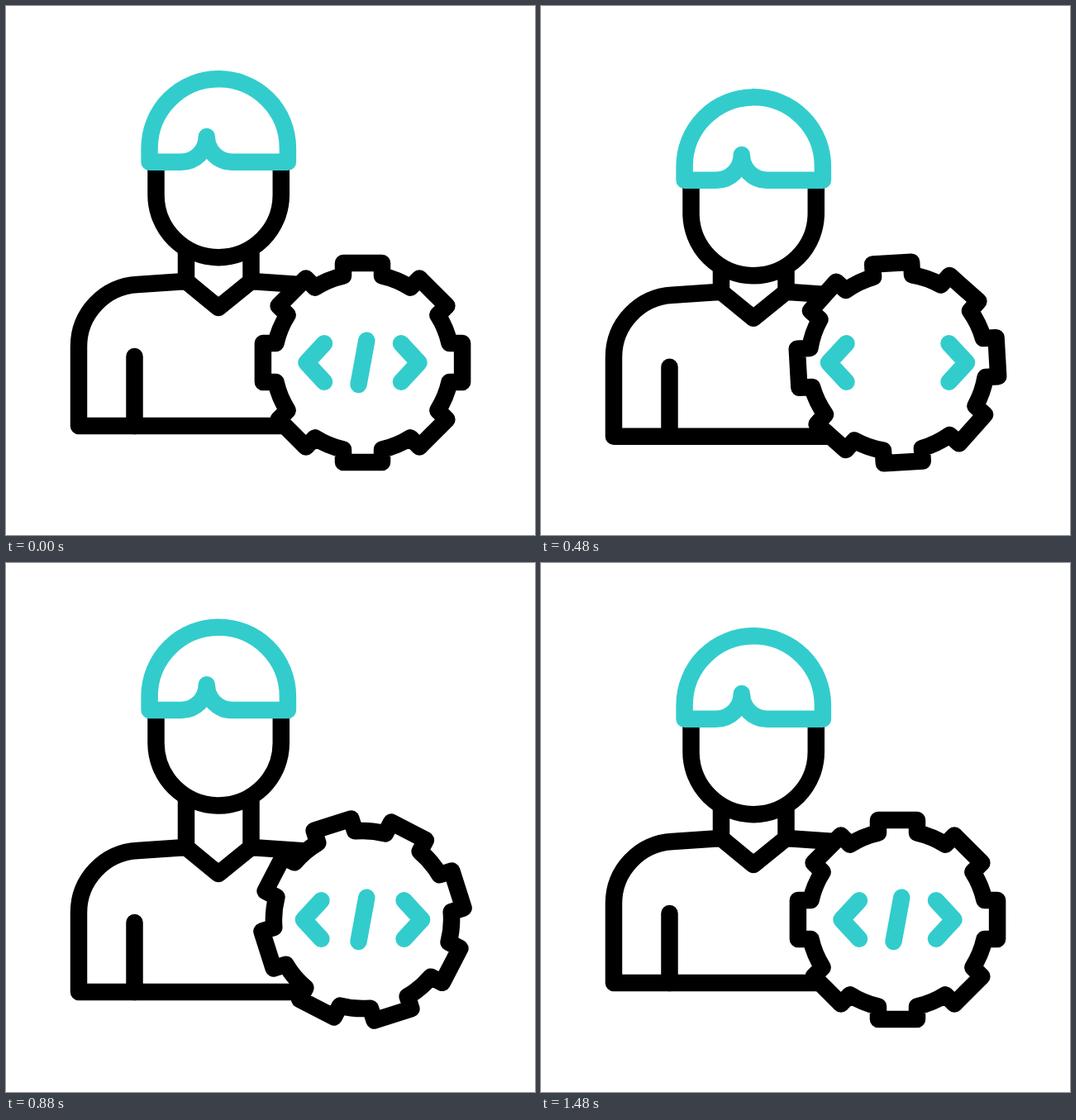
Animation, 640 px wide and 640 px high, one loop 1520 ms. Source, as an HTML page:

```html
<!DOCTYPE html>
<html lang="en">
<head>
<meta charset="utf-8">
<style>
  html, body { margin: 0; height: 100%; overflow: hidden; background: #fff; }
  svg { display: block; width: 100vw; height: 100vh; }
</style>
</head>
<body>
<svg viewBox="0 0 640 640" fill="none" stroke="#000" stroke-width="20.5" stroke-linejoin="round">
  <g id="body">
    <path d="M360 508H88V412A75 75 0 0 1 159 337L218 333L257 365L296.5 333L362 337.5"/>
    <path d="M155.5 424V508" stroke-linecap="round"/>
  </g>
  <path id="neck"/>
  <g id="head" fill="#fff">
    <path d="M181.5 190V228.5A75.6 75.6 0 0 0 332.8 228.5V190"/>
    <path stroke="#3cc" d="M173.6 188.7H212A30.8 30.8 0 0 0 242.8 158A30.8 30.8 0 0 0 273.6 188.7H340.9V172A83.6 83.6 0 0 0 173.6 172Z"/>
  </g>
  <path id="gear" fill="#fff"/>
  <g stroke="#3cc" stroke-linecap="round">
    <path id="left" d="M385 408.3L363.5 431.5L385 454.7"/>
    <path id="right" d="M478 408.3L499.5 431.5L478 454.7"/>
    <path id="slash" d="M436.3 404.7L426.5 458"/>
  </g>
</svg>
<script>
const LOOP = 1520, STEP = 40, CENTER = 431.5, TEETH = 8;
const part = id => document.getElementById(id);
const smooth = s => s * s * (3 - 2 * s);
const cubic = s => s < .5 ? 4 * s ** 3 : 1 - 4 * (1 - s) ** 3;
const progress = (t, from, to) => Math.min(1, Math.max(0, (t - from) / (to - from)));

// keys: [time, value] pairs, eased from one to the next
function track(t, keys) {
  let value = keys[0][1];
  for (let i = 1; i < keys.length; i++) {
    const [from, a] = keys[i - 1], [to, b] = keys[i];
    if (t >= from) value = a + (b - a) * smooth(progress(t, from, to));
  }
  return value;
}

function gearPath() {
  const tooth = [[-23.5, -105], [-23.5, -120.6], [23.5, -120.6], [23.5, -105]];
  let d = '';
  for (let i = 0; i < TEETH; i++) {
    const angle = i * 2 * Math.PI / TEETH, c = Math.cos(angle), s = Math.sin(angle);
    tooth.forEach(([x, y], k) => {
      const command = k ? 'L' : i ? 'A107.6 107.6 0 0 1 ' : 'M';
      d += `${command}${x * c - y * s} ${x * s + y * c}`;
    });
  }
  return d + 'A107.6 107.6 0 0 1 -23.5 -105Z';
}

const move = (id, x, y) => part(id).setAttribute('transform', `translate(${x} ${y})`);

function draw(t) {
  const body = track(t, [[140, 0], [600, 15.4], [640, 15.4], [1320, 0]]);
  const head = track(t, [[100, 0], [520, 22.6], [1080, -24.4], [1410, 0]]);
  const spread = track(t, [[0, 0], [520, 15.8], [1040, 0]]);
  const turn = 180 * cubic(progress(t, 0, 1240));
  move('body', 0, body);
  move('head', 0, head);
  part('neck').setAttribute('d', `M218 ${280 + head}V${333 + body}M296.5 ${280 + head}V${333 + body}`);
  part('gear').setAttribute('transform', `translate(${CENTER} ${CENTER}) rotate(${turn})`);
  move('left', -spread, 0);
  move('right', spread, 0);
  part('slash').style.visibility = t >= 400 && t < 640 ? 'hidden' : 'visible';
}

part('gear').setAttribute('d', gearPath());
const start = performance.now();
function tick() {
  const t = (performance.now() - start) % LOOP;
  draw(Math.floor(t / STEP) * STEP);
  requestAnimationFrame(tick);
}
tick();
</script>
</body>
</html>
```
